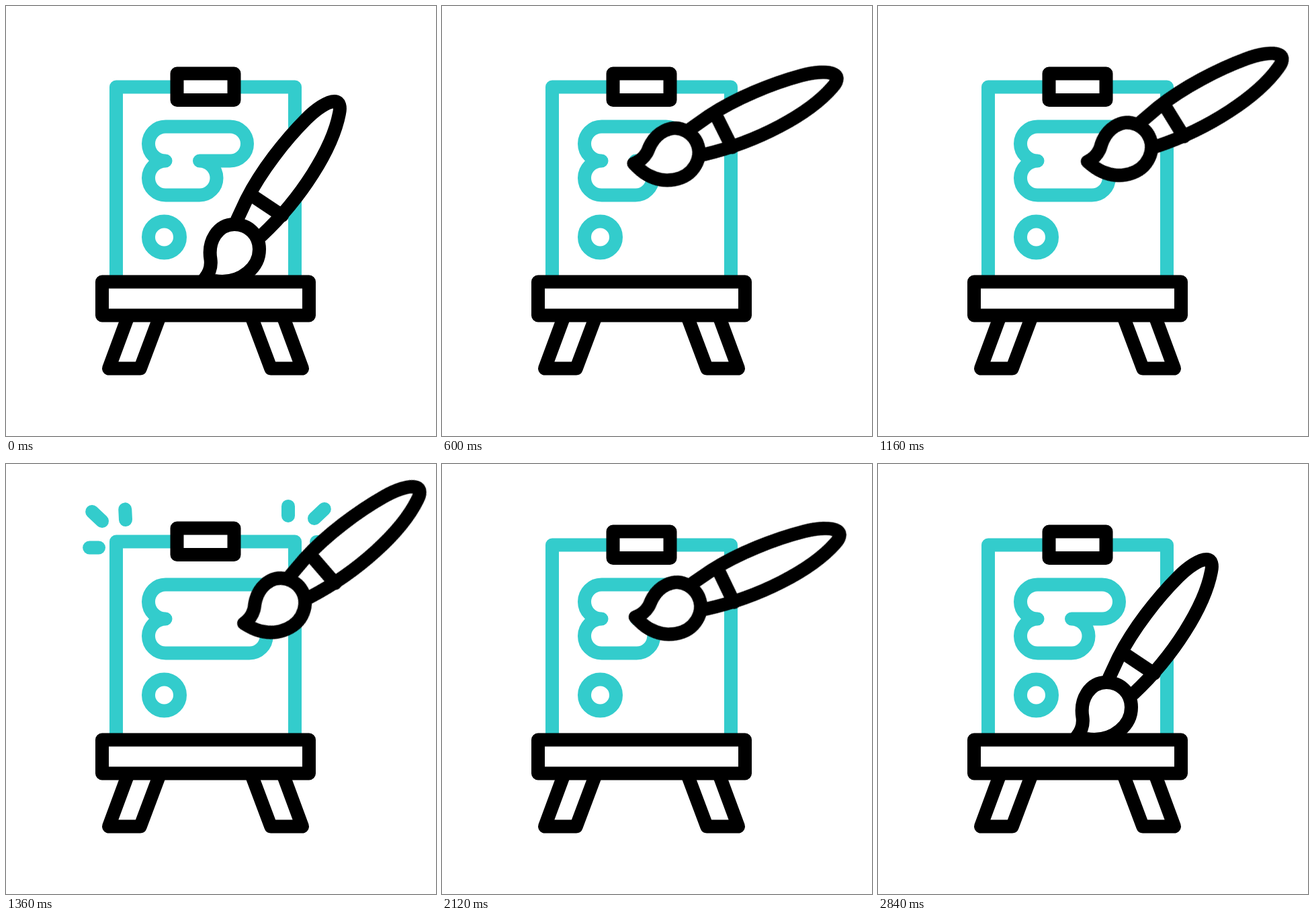
These frames come from a looping animation (640 by 640 pixels, 3000 ms). An HTML page without scripts:

```html
<!DOCTYPE html>
<html lang="en">
<head>
<meta charset="utf-8">
<title>Easel and brush</title>
<style>
  html, body { margin: 0; width: 100%; height: 100%; overflow: hidden; background: #fff; }
  svg { display: block; width: 100vw; height: 100vh; }
  path, rect, circle {
    fill: none; stroke: #000; stroke-width: 20;
    stroke-linecap: round; stroke-linejoin: round;
  }
  .solid { fill: #fff; }
  .teal, .sparks path { stroke: #33cccc; }

  .brush, .paint, .board, .sparks path {
    animation: 3s cubic-bezier(.333, 0, .667, 1) infinite;
  }
  .brush { transform-origin: 523px 300px; animation-name: stroke; }
  .paint { animation-name: stretch; }
  .board { animation-name: hop; }
  .sparks path { animation-name: spark; animation-timing-function: linear; }

  @keyframes stroke {
    0%, 6.667%      { transform: translate(0px, 0px) rotate(0deg); }
    21.8%, 32%      { transform: translate(12.3px, -45.9px) rotate(31deg); }
    48%, 57.333%    { transform: translate(83.1px, -108.7px) rotate(14.2deg); }
    72%, 80%        { transform: translate(12.3px, -45.9px) rotate(31deg); }
    94.667%, 100%   { transform: translate(0px, 0px) rotate(0deg); }
  }
  @keyframes stretch {
    0%, 32%, 72%, 100% {
      d: path("M237.5 179.5A25.5 25.5 0 0 0 237.5 230.5A25.5 25.5 0 0 0 237.5 281.5H288A25.5 25.5 0 0 0 288 230.5H333.5A25.5 25.5 0 0 0 333.5 179.5Z");
    }
    48%, 57.333% {
      d: path("M237.5 179.5A25.5 25.5 0 0 0 237.5 230.5A25.5 25.5 0 0 0 237.5 281.5H368A25.5 25.5 0 0 0 368 230.5H413.5A25.5 25.5 0 0 0 413.5 179.5Z");
    }
  }
  @keyframes hop {
    0%, 40%, 62.667%, 100% { transform: translateY(0px); }
    50.667%                { transform: translateY(-10px); }
  }
  /* The head runs out along each line, then the tail catches up. */
  @keyframes spark {
    0%, 43.3%   { visibility: hidden; stroke-dasharray: 0 300; stroke-dashoffset: 0; }
    43.333%     { visibility: visible; stroke-dasharray: 0 300; stroke-dashoffset: 0; }
    46.667%     { stroke-dasharray: 42 300; stroke-dashoffset: 0; }
    51.333%     { stroke-dasharray: 45 300; stroke-dashoffset: -55; }
    54%         { visibility: visible; stroke-dasharray: 0 300; stroke-dashoffset: -100; }
    54.01%, 100% { visibility: hidden; stroke-dasharray: 0 300; stroke-dashoffset: -100; }
  }
</style>
</head>
<body>
<svg viewBox="0 0 640 640">
  <g class="sparks">
    <path pathLength="100" d="M138 124.500H84"/>
    <path pathLength="100" d="M143 85L85 30"/>
    <path pathLength="100" d="M178 83L175 22"/>
    <path pathLength="100" d="M420 77V22"/>
    <path pathLength="100" d="M459 81L517 26"/>
    <path pathLength="100" d="M462 116H516"/>
  </g>

  <g class="board">
    <path class="teal" d="M164 425V120.500H430V425"/>
    <rect class="solid" x="254.500" y="100.500" width="85" height="39.500"/>
  </g>

  <path class="teal paint" d="M237.500 179.500A25.500 25.500 0 0 0 237.500 230.500A25.500 25.500 0 0 0 237.500 281.500H288A25.500 25.500 0 0 0 288 230.500H333.500A25.500 25.500 0 0 0 333.500 179.500Z"/>
  <circle class="teal" cx="235.500" cy="344" r="23.500"/>

  <path d="M181.300 463L153 539.500H199.800L228.500 463"/>
  <path d="M412.700 463L441 539.500H394.200L365.500 463"/>
  <rect class="solid" x="143" y="410.500" width="308" height="50"/>

  <g class="brush">
    <path class="solid" d="M344 318L358 288C380 245 415 200 447 168C461 154 478 142 489 142C497 142 498 151 496 160C486 212 440 286 380 342"/>
    <path d="M363 280L411 312"/>
    <path class="solid" d="M296 405.500C303 397 306 388 304.500 377C300 350 315 325 340 325C361 325 377 341 377 362C377 390 350 410 322 410C313 410 304 408 296 405.500Z"/>
  </g>
</svg>
</body>
</html>
```
